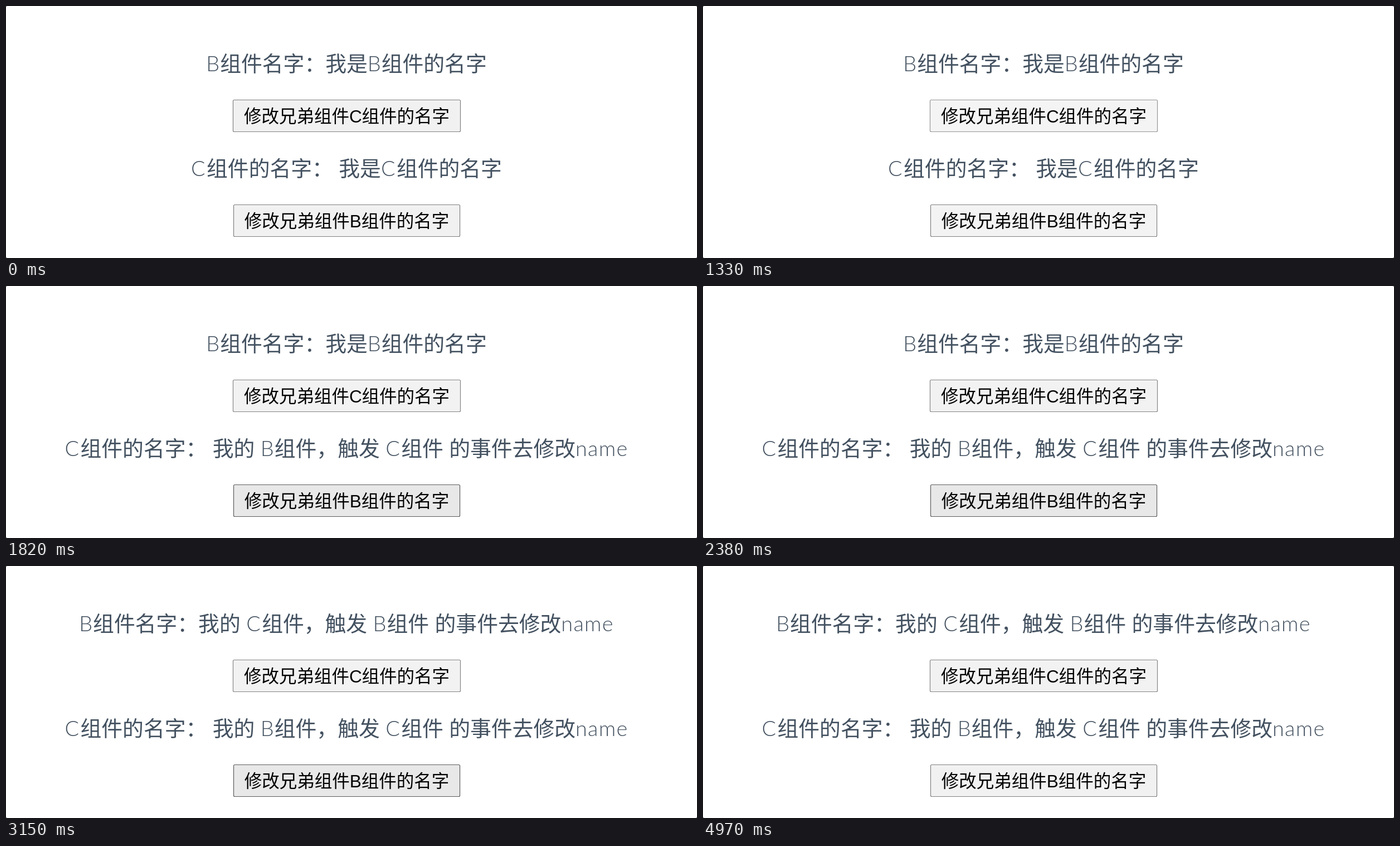
Recreate the animation shown at these times as an HTML page. Size 1240x452 px, loop 5250 ms.

```html
<!DOCTYPE html>
<html lang="zh-CN">
<head>
<meta charset="utf-8">
<title>兄弟组件</title>
<style>
html, body { margin: 0; width: 100%; height: 100%; overflow: hidden; background: #888; }
svg { display: block; width: 1240px; height: 452px; }
text { text-anchor: middle; white-space: pre; text-spacing-trim: space-all; }
.line { font: 37.8px Lato, "Noto Sans CJK SC", "Noto Sans CJK", sans-serif; fill: #435160; word-spacing: 0.8px; }
tspan { font-weight: 300; }
.b { letter-spacing: 1px; }
.c { letter-spacing: 2.4px; }
.n { letter-spacing: 1.3px; }
.label { font: 31.5px "Liberation Sans", "Noto Sans CJK SC", "Noto Sans CJK", sans-serif; fill: #000; }
rect { fill: #f1f1f1; stroke: #808080; stroke-width: 1.2; }
.line, rect { animation: 5250ms step-end infinite; }
.oldB { animation-name: oldB; }
.newB { animation-name: newB; }
.oldC { animation-name: oldC; }
.newC { animation-name: newC; }
.btnC { animation-name: btnC; }
.btnB { animation-name: btnB; }

/* text swaps on release: C at 1400 ms, B at 3080 ms */
@keyframes oldC { 0% { opacity: 1 } 26.666%, to { opacity: 0 } }
@keyframes newC { 0% { opacity: 0 } 26.666%, to { opacity: 1 } }
@keyframes oldB { 0% { opacity: 1 } 58.666%, to { opacity: 0 } }
@keyframes newB { 0% { opacity: 0 } 58.666%, to { opacity: 1 } }

/* idle, hover, pressed, hover, idle */
@keyframes btnC {
  0% { fill: #f1f1f1; stroke: #808080 }
  1.333% { fill: #f3f3f3; stroke: #808080 }
  20% { fill: #e8e8e8; stroke: #5c5c5c }
  25.333% { fill: #f4f4f4; stroke: #959595 }
  26.666% { fill: #e8e8e8; stroke: #5c5c5c }
  30.666%, to { fill: #f2f2f2; stroke: #858585 }
}
@keyframes btnB {
  0% { fill: #f1f1f1; stroke: #808080 }
  1.333% { fill: #f3f3f3; stroke: #808080 }
  34.666% { fill: #e8e8e8; stroke: #5c5c5c }
  40% { fill: #f2f2f2; stroke: #808080 }
  45.333% { fill: #e8e8e8; stroke: #5c5c5c }
  57.333% { fill: #f4f4f4; stroke: #959595 }
  58.666% { fill: #e8e8e8; stroke: #5c5c5c }
  77.333%, to { fill: #f1f1f1; stroke: #808080 }
}
</style>
</head>
<body>
<svg viewBox="0 0 1240 452">
  <path d="M2 0H1238L1240 2V450L1238 452H2L0 450V2Z" fill="#fff"/>

  <text class="line oldB" x="611" y="117"><tspan class="b">B</tspan>组件名字：我是<tspan class="b">B</tspan>组件的名字</text>
  <text class="line newB" x="611" y="117"><tspan class="b">B</tspan>组件名字：我的 <tspan class="c">C</tspan>组件，触发 <tspan class="b">B</tspan>组件 的事件去修改<tspan class="n">name</tspan></text>
  <rect class="btnC" x="407.5" y="168.5" width="408" height="57" rx="2"/>
  <text class="label" x="611.5" y="209">修改兄弟组件C组件的名字</text>

  <text class="line oldC" x="611" y="305"><tspan class="c">C</tspan>组件的名字： 我是<tspan class="c">C</tspan>组件的名字</text>
  <text class="line newC" x="611" y="305"><tspan class="c">C</tspan>组件的名字： 我的 <tspan class="b">B</tspan>组件，触发 <tspan class="c">C</tspan>组件 的事件去修改<tspan class="n">name</tspan></text>
  <rect class="btnB" x="408.5" y="356.5" width="406" height="57" rx="2"/>
  <text class="label" x="611.5" y="397">修改兄弟组件B组件的名字</text>
</svg>
</body>
</html>
```
